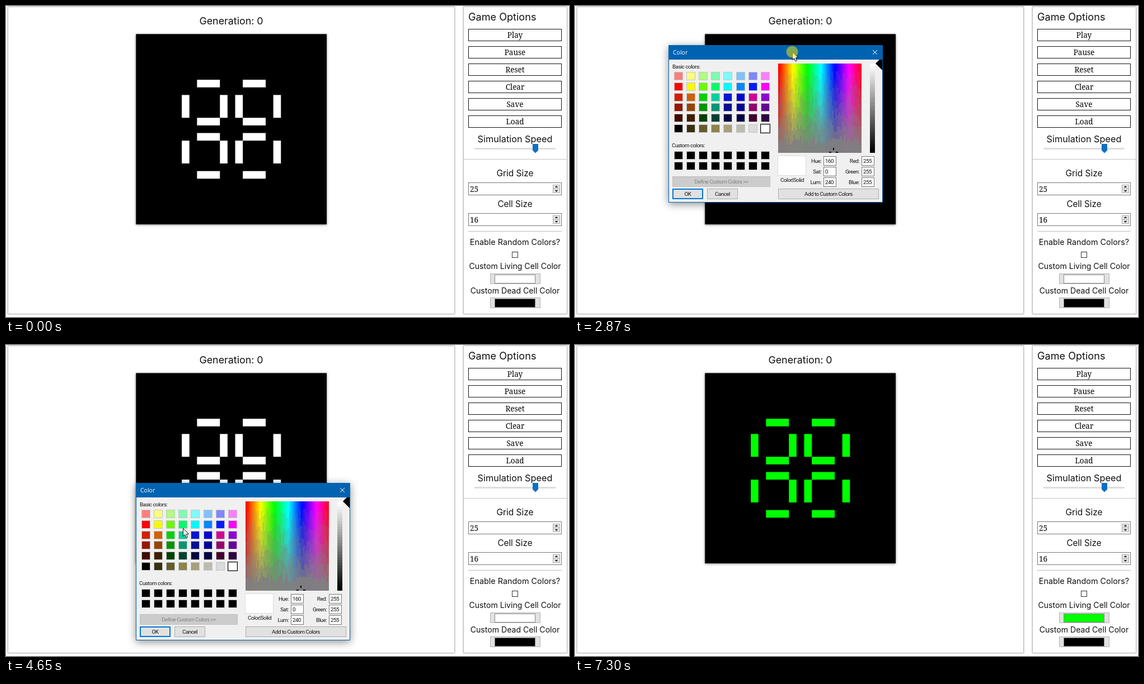
These frames come from a looping animation (1006x557 px, 8000 ms). An HTML page with a canvas:

```html
<!DOCTYPE html>
<html lang="en">
<head>
<meta charset="utf-8">
<title>Cell colour picker</title>
<style>
html, body { margin: 0; width: 100%; height: 100%; overflow: hidden; background: #fff; }
canvas { display: block; }
</style>
</head>
<body>
<canvas id="stage" width="1006" height="557"></canvas>
<script>
const ctx = document.getElementById('stage').getContext('2d');
const LOOP = 8000, TICK = 202.4;
const UI = 'Inter, "Open Sans", sans-serif';
const SLAB = '"Noto Serif", serif';
const SMALL = 'Roboto, "Liberation Sans", sans-serif';
const GREEN = '#0f0';

// Moments in ticks.
const ENTER = 2, LEAVE = 10, OPEN = 13, DROP = 18, PICK = 24, CONFIRM = 29, CLOSE = 30, EXIT = 36;

// Key points of the pointer path: tick, x, y.
const PATH = [
  [ENTER, 785, 395], [7, 918, 492], [8, 918, 492], [9, 890, 487],
  [OPEN, 220, 12], [14, 388, 82], [16, 440, 120], [DROP, 453, 259],
  [19, 453, 259], [23, 291, 341], [25, 291, 345], [28, 272, 511],
  [CLOSE, 277, 505], [33, 580, 341], [EXIT, 900, 557]
];

function pointerAt(tick) {
  const next = Math.max(1, PATH.findIndex(p => p[0] >= tick));
  const [t0, x0, y0] = PATH[next - 1], [t1, x1, y1] = PATH[next];
  const u = (tick - t0) / (t1 - t0), ease = u * u * (3 - 2 * u);
  return [x0 + (x1 - x0) * ease, y0 + (y1 - y0) * ease].map(Math.round);
}

function rect(x, y, w, h, color) {
  ctx.fillStyle = color;
  ctx.fillRect(x, y, w, h);
}

function box(x, y, w, h, fill, border, line = 1) {
  rect(x, y, w, h, border);
  rect(x + line, y + line, w - 2 * line, h - 2 * line, fill);
}

// y is the middle of the capitals.
function text(s, x, y, size, family = UI, align = 'center', color = '#111') {
  ctx.font = `${size}px ${family}`;
  ctx.letterSpacing = family === SMALL ? '-0.5px' : '0px';
  ctx.textAlign = align;
  ctx.fillStyle = color;
  ctx.fillText(s, x, y + size * 0.36);
}

const label = (s, x, y, align = 'left', color) => text(s, x, y, 9.8, SMALL, align, color);

function shape(points, fill, stroke) {
  ctx.beginPath();
  for (const [x, y] of points) ctx.lineTo(x, y);
  ctx.closePath();
  ctx.fillStyle = fill;
  ctx.fill();
  if (stroke) {
    ctx.strokeStyle = stroke;
    ctx.lineWidth = 1;
    ctx.stroke();
  }
}

function shadowed(blur, dy, alpha, draw) {
  ctx.save();
  ctx.shadowColor = `rgba(0,0,0,${alpha})`;
  ctx.shadowBlur = blur;
  ctx.shadowOffsetY = dy;
  draw();
  ctx.restore();
}

function clipped(x, y, w, h, draw) {
  ctx.save();
  ctx.beginPath();
  ctx.rect(x, y, w, h);
  ctx.clip();
  draw();
  ctx.restore();
}

function drawGrid(color) {
  const cell = 13.63, x0 = 232.3, y0 = 50.3;
  shadowed(4, 1, 0.5, () => rect(x0, y0, 25 * cell, 25 * cell, '#000'));
  const block = (c, r, w, h) => rect(x0 + c * cell, y0 + r * cell, w * cell, h * cell, color);
  for (const a of [6, 11, 13, 18])
    for (const b of [8, 14]) {
      block(a, b, 1, 3);
      block(b, a, 3, 1);
    }
}

function numberInput(value, y) {
  box(826, y, 167, 23, '#fff', '#777');
  text(value, 829, y + 12, 13.5, SLAB, 'left', '#000');
  box(977, y + 4, 13, 15, '#e6e6e6', '#aaa');
  rect(977, y + 11, 13, 1, '#aaa');
  for (const d of [-1, 1]) {
    const base = y + 11.5 + d * 2.5;
    shape([[980.5, base], [983.5, base + d * 3], [986.5, base]], '#222');
  }
}

function colorInput(color, y) {
  box(865, y, 90, 19, '#e1e1e1', '#b4b4b4');
  box(873, y + 2, 73, 16, color, '#888');
}

function drawPage(cells, living) {
  rect(0, 0, 1006, 557, '#fff');
  shadowed(3, 0, 0.2, () => {
    box(3, 1, 799, 551, '#fff', '#ccc');
    box(817, 1, 186, 551, '#fff', '#ccc');
  });
  text('Generation: 0', 402.5, 26.5, 17.85);
  drawGrid(cells);

  text('Game Options', 826, 19.5, 18.1, UI, 'left');
  ['Play', 'Pause', 'Reset', 'Clear', 'Save', 'Load'].forEach((name, i) => {
    box(826, 41 + i * 31, 167, 22, '#fff', '#111');
    text(name, 909.5, 52 + i * 31, 13.5, SLAB, 'center', '#000');
  });
  text('Simulation Speed', 909.5, 238, 16.3);
  rect(837, 254, 145, 3, '#ddd');
  shape([[941, 247], [951, 247], [951, 258.5], [946, 263.5], [941, 258.5]], '#0d6fc4');
  rect(818, 274, 184, 1, '#c4c4c4');

  text('Grid Size', 909.5, 299.5, 15.5);
  numberInput('25', 316);
  text('Cell Size', 909.5, 355, 15.2);
  numberInput('16', 371);
  rect(826, 403, 167, 1, '#bbb');

  text('Enable Random Colors?', 909.5, 422.5, 14.4);
  box(904, 440, 11, 11, '#fff', '#333');
  text('Custom Living Cell Color', 909.5, 466, 14.1);
  colorInput(living, 479);
  text('Custom Dead Cell Color', 909.5, 509.5, 14.1);
  colorInput('#000', 522);
}

function button(name, x, w, y = 257, fill = '#e1e1e1', border = '#adadad', line = 1, color = '#111') {
  box(x, y, w, 19, fill, border, line);
  label(name, x + w / 2, y + 9.5, 'center', color);
}

// Two bright rows, three deep rows, then a ramp from black to white.
const BRIGHT = [0, 60, 95, 145, 180, 208, 235, 300];
const DEEP = [8, 27, 120, 165, 235, 240, 318, 280];
const LIGHT = [74, 50, 42, 30, 13];

function basicColor(col, row) {
  if (row === 5) return `hsl(50 ${60 - col * 10}% ${col / 7 * 100}%)`;
  return `hsl(${(row < 2 ? BRIGHT : DEEP)[col]} 95% ${LIGHT[row]}%)`;
}

function wells(rows, top, colorAt) {
  for (let row = 0; row < rows; row++)
    for (let col = 0; col < 8; col++) {
      const x = Math.round(17 + col * 22.1), y = Math.round(top + row * 18.8);
      rect(x - 8, y - 7, 16, 15, '#c4c4c4');
      rect(x - 7, y - 6, 14, 13, colorAt(col, row));
    }
}

function markWell(col, row, dotted) {
  const x = Math.round(17 + col * 22.1), y = Math.round(55 + row * 18.8);
  ctx.strokeStyle = '#000';
  ctx.lineWidth = 1;
  ctx.strokeRect(x - 8.5, y - 7.5, 17, 16);
  if (!dotted) return;
  ctx.setLineDash([1, 1]);
  ctx.strokeRect(x - 10.5, y - 9.5, 21, 20);
  ctx.setLineDash([]);
}

function field(name, value, x, y) {
  label(name, x - 4, y, 'right');
  box(x, y - 8, 23, 17, '#fff', '#777');
  label(value, x + 3, y);
}

function noise(n) {
  const v = Math.sin(n * 127.1) * 43758.5453;
  return v - Math.floor(v);
}

// Hue runs across and fades to grey downwards in ragged bands.
function drawSpectrum(hue, sat) {
  const left = 195, top = 33, w = 149, h = 160, cols = 50, bands = 7;
  clipped(left, top, w, h, () => {
    for (let i = 0; i < cols; i++) {
      const x = left + i * 3;
      for (let b = 0; b < bands; b++) {
        const y = b ? top + (b + noise(i * bands + b) * 0.9 - 0.45) * h / bands : top;
        const fade = b / (bands - 1);
        rect(x, y, 3, top + h - y, `hsl(${i / cols * 360} ${100 - fade * 98}% 50%)`);
      }
    }
    const x = Math.round(left + hue / 240 * w), y = top + (1 - sat / 240) * (h - 1);
    for (const d of [-8, 4]) {
      rect(x + d, y - 1, 4, 2, '#000');
      rect(x - 1, y + d, 2, 4, '#000');
    }
  });
}

function drawLuminance(sat, lum) {
  for (let i = 0; i < 32; i++)
    rect(359, 33 + i * 5, 9, 5, `hsl(120 ${sat / 2.4}% ${100 - i / 31 * 100}%)`);
  const y = 33 + (1 - lum / 240) * 160;
  clipped(368, 26, 13, 254, () => shape([[369, y], [381, y - 12], [381, y + 12]], '#000'));
}

function drawDialog(left, top, picked, hover) {
  const [hue, sat, lum, red, blue] = picked ? [80, 240, 120, 0, 0] : [160, 0, 240, 255, 255];
  const color = picked ? GREEN : '#fff';
  ctx.save();
  ctx.translate(left, top);
  shadowed(14, 3, 0.45, () => rect(-1, 0, 383, 282, '#0063b1'));
  rect(0, 26, 381, 255, '#f0f0f0');
  text('Color', 7, 13, 10.5, '"Open Sans", sans-serif', 'left', '#fff');
  for (const d of [-4, 4]) shape([[368 - d, 9], [368 + d, 17]], '#fff', '#fff');

  label('Basic colors:', 6, 38);
  wells(6, 55, (col, row) => picked && col === 2 && row === 2 ? GREEN : basicColor(col, row));
  if (picked) markWell(2, 2, true);
  else markWell(7, 5);
  label('Custom colors:', 5, 179);
  wells(2, 197, () => '#000');

  button('Define Custom Colors >>', 6, 175, 235, '#ccc', '#bfbfbf', 1, '#838383');
  button('OK', 6, 55, 257, hover ? '#e5f1fb' : '#e1e1e1', '#0078d7', hover ? 1 : 2);
  button('Cancel', 68, 55);
  button('Add to Custom Colors', 195, 180);

  drawSpectrum(hue, sat);
  drawLuminance(sat, lum);
  box(194, 198, 51, 36, color, '#ddd');
  label('Color|Solid', 220, 241, 'center');
  field('Hue:', hue, 276, 207);
  field('Sat:', sat, 276, 226);
  field('Lum:', lum, 276, 245);
  field('Red:', red, 344, 207);
  field('Green:', 255, 344, 226);
  field('Blue:', blue, 344, 245);
  ctx.restore();
}

function drawPointer(x, y, pressed) {
  const arrow = [[0, 0], [0, 14], [3.2, 11], [5.5, 16.5], [8, 15.5], [5.7, 10.2], [10, 10]];
  shape(arrow.map(([dx, dy]) => [x + dx + 0.5, y + dy + 0.5]), '#fff', '#111');
  if (!pressed) return;
  ctx.beginPath();
  ctx.arc(x, y, 10.5, 0, Math.PI * 2);
  ctx.fillStyle = 'rgba(250,230,0,.52)';
  ctx.fill();
}

function frame(now) {
  const tick = Math.floor(now % LOOP / TICK);
  const within = (from, to) => tick >= from && tick < to;
  drawPage(tick < CLOSE ? '#fff' : GREEN, tick < PICK ? '#fff' : GREEN);

  const visible = within(ENTER, LEAVE) || within(OPEN, EXIT);
  if (!visible) return;
  const [x, y] = pointerAt(tick);
  if (within(OPEN, CLOSE)) {
    const [gripX, gripY] = pointerAt(Math.min(tick, DROP));
    const left = gripX - 220, top = gripY - 12;
    drawDialog(left, top, tick >= PICK, x < left + 61 && y > top + 257);
  }
  drawPointer(x, y, within(OPEN, DROP + 1) || tick === PICK || tick === CONFIRM);
}

const start = performance.now();
function run() {
  frame(performance.now() - start);
  requestAnimationFrame(run);
}
run();
</script>
</body>
</html>
```
